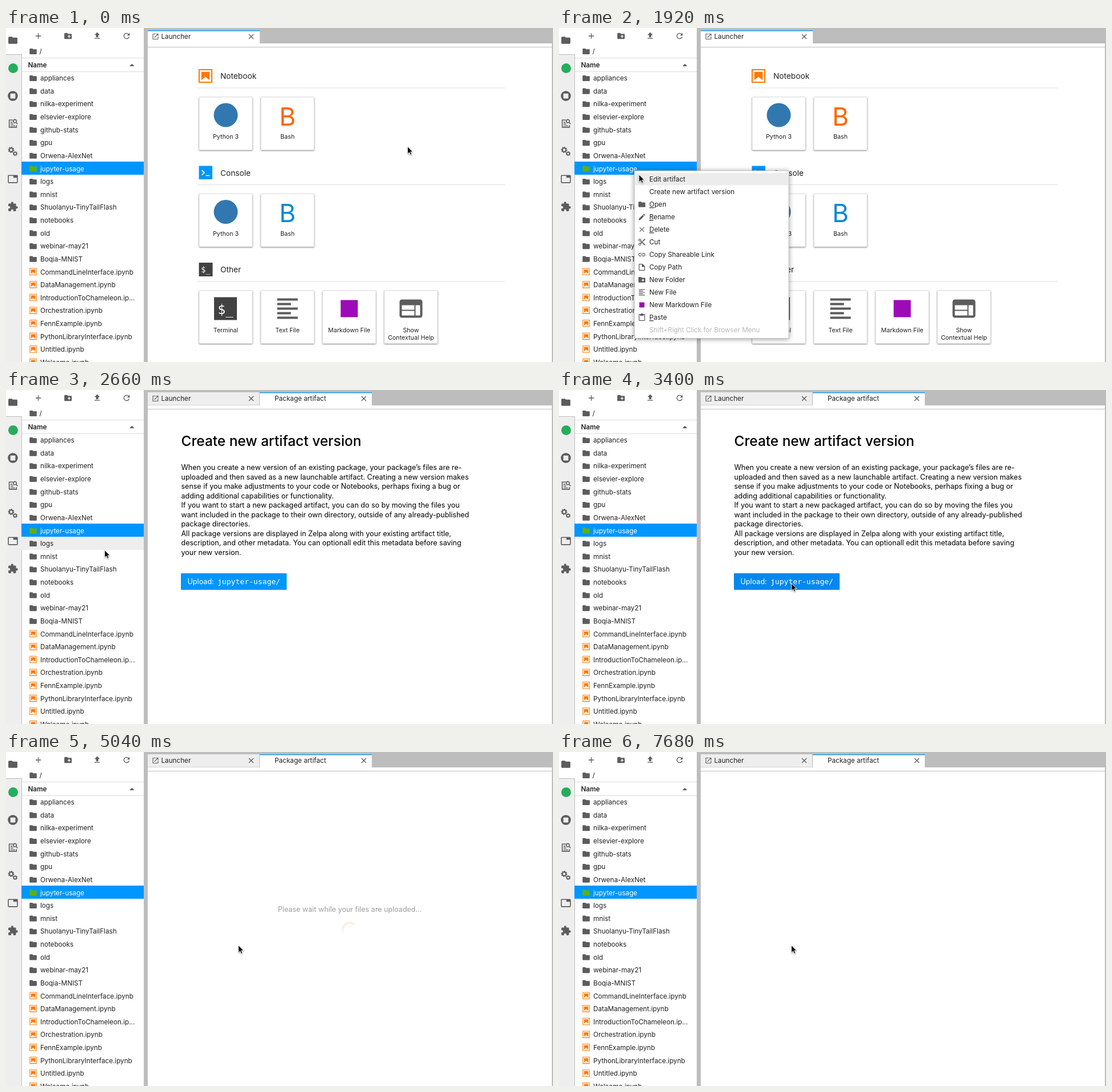
Write an HTML page that moves like this. It is 957 by 585 pixels and loops after 8000 ms.

```html
<!DOCTYPE html>
<html lang="en">
<head>
<meta charset="utf-8">
<title>Package artifact</title>
<style>
html, body { margin: 0; width: 100%; height: 100%; overflow: hidden; background: #fff; }
svg { display: block; width: 957px; height: 585px; }
text { font: 11.7px Inter, "Open Sans", sans-serif; font-optical-sizing: none; fill: #212121; white-space: pre; }
.bold { font-weight: 600; }
.medium { font-weight: 500; }
.mono { font-family: "DejaVu Sans Mono", monospace; }
.mid { text-anchor: middle; }
.card { fill: #fff; stroke: #e2e2e2; filter: drop-shadow(0 1px 1.3px #0007); }
.menu { fill: #fff; stroke: #c4c4c4; filter: drop-shadow(0 1px 4px #0006); }
.arrow { stroke: #fff; stroke-width: 1; filter: drop-shadow(0 1px 1px #0006); }
</style>
</head>
<body>
<svg id="stage" viewBox="0 0 957 585"></svg>
<script>
const GREY = '#5c5c5c', BLUE = '#0096ff', ORANGE = '#ff7800', LINE = '#bdbdbd', PURPLE = '#9c0bb5';
const ROW = 22.62, ROWS_TOP = 76;

// Icon outlines on a 24 x 24 grid
const ICONS = {
  folder: 'M10 4H4c-1.1 0-2 .9-2 2v12c0 1.1.9 2 2 2h16c1.1 0 2-.9 2-2V8c0-1.1-.9-2-2-2h-8z',
  newFolder: 'M20 6h-8l-2-2H4c-1.1 0-2 .9-2 2v12c0 1.1.9 2 2 2h16c1.1 0 2-.9 2-2V8c0-1.1-.9-2-2-2zm-1 8h-3v3h-2v-3h-3v-2h3V9h2v3h3z',
  add: 'M19 13h-6v6h-2v-6H5v-2h6V5h2v6h6z',
  upload: 'M5 20h14v-2H5zm0-10h4v6h6v-6h4l-7-7z',
  refresh: 'M17.65 6.35C16.2 4.9 14.2 4 12 4a8 8 0 1 0 7.73 10h-2.08A6 6 0 1 1 12 6c1.66 0 3.14.69 4.22 1.78L13 11h7V4z',
  puzzle: 'M20.5 11H19V7c0-1.1-.9-2-2-2h-4V3.5a2.5 2.5 0 0 0-5 0V5H4c-1.1 0-2 .9-2 2v3.8h1.5a2.7 2.7 0 0 1 0 5.4H2V20c0 1.1.9 2 2 2h3.8v-1.5a2.7 2.7 0 0 1 5.4 0V22H17c1.1 0 2-.9 2-2v-4h1.5a2.5 2.5 0 0 0 0-5z',
  tab: 'M21 3H3c-1.1 0-2 .9-2 2v14c0 1.1.9 2 2 2h18c1.1 0 2-.9 2-2V5c0-1.1-.9-2-2-2zm0 16H3V5h10v4h8z',
  stop: 'M12 2a10 10 0 1 0 0 20a10 10 0 1 0 0-20zM8 7h8q1 0 1 1v8q0 1-1 1H8q-1 0-1-1V8q0-1 1-1z',
  inspect: 'M3 3h9v2H5v14h14v-4h2v6H3zM7 8h4v2H7zm0 4h6v2H7zm0 4h10v1.6H7zM16.5 2a4.5 4.5 0 1 0 0 9q1.2 0 2.2-.5l3 3 1.4-1.4-2.9-3A4.5 4.5 0 0 0 16.5 2zm0 2a2.5 2.5 0 1 1 0 5a2.5 2.5 0 1 1 0-5z',
  edit: 'M3 17.25V21h3.75L17.8 9.94l-3.75-3.75zM20.7 7.04q.7-.7 0-1.4l-2.34-2.35q-.7-.7-1.4 0l-1.83 1.83 3.75 3.75z',
  close: 'M19 6.4L17.6 5 12 10.6 6.4 5 5 6.4 10.6 12 5 17.6 6.4 19 12 13.4 17.6 19 19 17.6 13.4 12z',
  cut: 'M6 2a4 4 0 1 0 1.64 7.64L10 12l-2.36 2.36A4 4 0 1 0 9.64 16.36L12 14l7 7h3v-1L9.64 7.64A4 4 0 0 0 6 2zm0 2a2 2 0 1 1 0 4a2 2 0 1 1 0-4zm0 12a2 2 0 1 1 0 4a2 2 0 1 1 0-4zM19 3l-6 6 2 2 7-7V3z',
  link: 'M11 7H7a5 5 0 0 0 0 10h4v-1.9H7a3.1 3.1 0 0 1 0-6.2h4zM8 11h8v2H8zM13 7h4a5 5 0 0 1 0 10h-4v-1.9h4a3.1 3.1 0 0 0 0-6.2h-4z',
  file: 'M5 2h9l7 7v11q0 2-2 2H5q-2 0-2-2V4q0-2 2-2zM5 4v16h14v-9h-7V4z',
  lines: 'M15 15H3v2h12zm0-8H3v2h12zM3 13h18v-2H3zm0 8h18v-2H3zM3 3v2h18V3z',
  paste: 'M19 2h-4.2a3 3 0 0 0-5.6 0H5c-1.1 0-2 .9-2 2v16c0 1.1.9 2 2 2h14c1.1 0 2-.9 2-2V4c0-1.1-.9-2-2-2zm0 18H5V4h2v3h10V4h2z',
  launch: 'M19 19H5V5h7V3H5q-2 0-2 2v14q0 2 2 2h14q2 0 2-2v-7h-2zM14 3v2h3.6l-9.8 9.8 1.4 1.4L19 6.4V10h2V3z',
  help: 'M20 4H4c-1.1 0-2 .9-2 2v12c0 1.1.9 2 2 2h16c1.1 0 2-.9 2-2V6c0-1.1-.9-2-2-2zm-5 14H4v-4h11zm0-5H4V9h11zm5 5h-4V9h4z',
  notebook: 'M2 2h20v20H2zM3.7 3.7v16.6h16.6V3.7zM6 6h12v12l-6-4.7L6 18z',
};

const icon = (name, x, y, size, color = GREY) =>
  `<path d="${ICONS[name]}" fill="${color}" fill-rule="evenodd" transform="translate(${x - size / 2} ${y - size / 2}) scale(${size / 24})"/>`;
const rect = (x, y, w, h, fill, more = '') =>
  `<rect x="${x}" y="${y}" width="${w}" height="${h}" fill="${fill}" ${more}/>`;
const dot = (x, y, r, fill) => `<circle cx="${x}" cy="${y}" r="${r}" fill="${fill}"/>`;
const text = (x, y, str, { size = 11.7, color = '#212121', cls = '' } = {}) =>
  `<text x="${x}" y="${y}" class="${cls}" style="font-size:${size}px;fill:${color}">${str}</text>`;
const group = (id, body) => `<g id="${id}">${body}</g>`;
const gear = (x, y, r) => `<g fill="none" stroke="${GREY}"><circle cx="${x}" cy="${y}" r="${r * .62}" stroke-width="${r * .42}"/>
  <circle cx="${x}" cy="${y}" r="${r * .88}" stroke-width="${r * .3}" pathLength="16" stroke-dasharray="1"/></g>`;

const folders = ['appliances', 'data', 'nilka-experiment', 'elsevier-explore', 'github-stats', 'gpu',
  'Orwena-AlexNet', 'jupyter-usage', 'logs', 'mnist', 'Shuolanyu-TinyTailFlash', 'notebooks', 'old',
  'webinar-may21', 'Boqia-MNIST'];
const notebooks = ['CommandLineInterface.ipynb', 'DataManagement.ipynb', 'IntroductionToChameleon.ip...',
  'Orchestration.ipynb', 'FennExample.ipynb', 'PythonLibraryInterface.ipynb', 'Untitled.ipynb', 'Welcome.ipynb'];
const SELECTED = 7;
const rowTop = i => Math.round(ROWS_TOP + ROW * i);

function sidebar() {
  const rows = [...folders, ...notebooks].map((name, i) => {
    const y = 88 + ROW * i, on = i === SELECTED;
    return (i < folders.length ? icon('folder', 47.5, y, 15.2, on ? '#5fae1c' : GREY)
                               : icon('notebook', 47.5, y - .5, 15, ORANGE))
      + text(60, y + 4.2, name, { color: on ? '#fff' : undefined });
  }).join('');
  return rect(0, 0, 28, 585, '#eee') + rect(0, 0, 28, 46, '#fff')
    + rect(0, 46, 28, 1, LINE) + rect(27, 46, 1, 539, LINE)
    + icon('folder', 12, 21.5, 19) + dot(12.5, 70.5, 8.5, '#25ad5c') + icon('stop', 12, 119, 21)
    + icon('inspect', 12, 167.5, 19) + gear(9, 213.5, 5.3) + gear(16, 220, 4)
    + icon('tab', 12, 264.5, 19) + icon('puzzle', 12, 313, 19)
    + icon('add', 56.5, 14, 16) + icon('newFolder', 108.5, 14, 15.5)
    + icon('upload', 159.5, 13.5, 16) + icon('refresh', 211, 14, 16)
    + icon('folder', 47.5, 41, 15) + text(58.5, 45.2, '/')
    + rect(28, 52, 213, 1, '#dcdcdc') + rect(28, 76, 213, 1, '#dcdcdc')
    + text(38.5, 69, 'Name', { cls: 'bold' }) + `<path d="M216 67l4.2-4.2 4.2 4.2z" fill="${GREY}"/>`
    + rect(27, 0, 214, 23, '#eee', 'id="hover"')
    + rect(27, rowTop(SELECTED), 214, 23, BLUE) + rows;
}

const dock = () => rect(241, 0, 716, 585, LINE) + rect(248, 27, 707, 558, '#fff') + rect(248, 33, 707, 1, LINE);

const tab = (x, active) => active
  ? rect(x, 4, 196, 24, '#fff') + rect(x, 4, 196, 1.5, '#1a9cf5')
  : rect(x, 4, 195, 22.5, '#eee');
const launcherTab = active => tab(248, active) + icon('launch', 261.5, 15, 13.5)
  + text(271.5, 19.2, 'Launcher') + icon('close', 429, 15, 15.5);

const shell = (x, y, s, font) => rect(x - s / 2, y - s / 2, s, s, '#424242')
  + text(x, y + font * .4, '$_', { size: font, color: '#fff', cls: 'mono mid' });

function launcher() {
  const section = (y, title) => text(375, y + 5, title, { size: 13.7 }) + rect(335, y + 20.5, 538, 1, '#dedede');
  const card = (col, y, picture, ...labels) => {
    const x = 384.5 + 108 * col;
    return `<rect class="card" x="${x - 46.5}" y="${y}" width="93" height="92.5" rx="1"/>` + picture(x, y + 31.5)
      + labels.map((s, i) => text(x, y + 73 + 13 * i, s, { size: 10.7, cls: 'mid' })).join('');
  };
  const disc = (x, y) => dot(x, y, 21, '#3278b0');
  const letter = color => (x, y) => text(x, y + 18, 'B', { size: 44, color, cls: 'mid' });
  return launcherTab(true)
    + section(84, 'Notebook') + icon('notebook', 349, 84, 29, ORANGE)
    + card(0, 121, disc, 'Python 3') + card(1, 121, letter('#ff6600'), 'Bash')
    + section(253.5, 'Console') + rect(337.5, 241.5, 23.5, 23.5, BLUE)
    + '<path d="M342.500 249l4.500 4.300-4.500 4.300M349.500 258.500h7" fill="none" stroke="#fff" stroke-width="1.700"/>'
    + card(0, 290.5, disc, 'Python 3') + card(1, 290.5, letter('#0a88d8'), 'Bash')
    + section(423, 'Other') + shell(349.5, 423, 24, 13.5)
    + card(0, 460, (x, y) => shell(x - .5, y, 40, 22.5), 'Terminal')
    + card(1, 460, (x, y) => icon('lines', x, y, 48), 'Text File')
    + card(2, 460, (x, y) => rect(x - 15, y - 15, 30, 30, PURPLE), 'Markdown File')
    + card(3, 460, (x, y) => icon('help', x, y, 48), 'Show', 'Contextual Help');
}

const packageTab = () => launcherTab(false) + tab(444, true)
  + text(470, 19.2, 'Package artifact') + icon('close', 626, 15, 15.5);

function form() {
  const lines = [
    'When you create a new version of an existing package, your package’s files are re-',
    'uploaded and then saved as a new launchable artifact. Creating a new version makes',
    'sense if you make adjustments to your code or Notebooks, perhaps fixing a bug or',
    'adding additional capabilities or functionality.',
    'If you want to start a new packaged artifact, you can do so by moving the files you',
    'want included in the package to their own directory, outside of any already-published',
    'package directories.',
    'All package versions are displayed in Zelpa along with your existing artifact title,',
    'description, and other metadata. You can optionall edit this metadata before saving',
    'your new version.'];
  return text(306.5, 97.7, 'Create new artifact version', { size: 24.4, color: '#000', cls: 'medium' })
    + lines.map((s, i) => text(306.5, 140.2 + 16.5 * i, s, { size: 12.5, color: '#000' })).join('')
    + rect(306, 321, 185, 29, BLUE, 'id="button" rx="1"')
    + text(317.5, 340.3, 'Upload:', { size: 12.6, color: '#fff' })
    + text(370, 340.3, 'jupyter-usage/', { size: 13.05, color: '#fff', cls: 'mono' });
}

const waiting = () => text(601.5, 280.4, 'Please wait while your files are uploaded...', { size: 12.5, color: '#9e9e9e', cls: 'mid' })
  + `<linearGradient id="fade"><stop offset=".1" stop-color="#ff6a00"/><stop offset=".42" stop-color="#ff6a00" stop-opacity="0"/></linearGradient>`
  + group('spinner', dot(0, 0, 14.2, 'url(#fade)') + '<path d="M0 0H-14.200A14.200 14.200 0 0 1 0-14.200z" fill="#ff6a00"/>' + dot(0, 0, 10.7, '#fff'));

function menu() {
  const key = s => `<tspan text-decoration="underline">${s[0]}</tspan>${s.slice(1)}`;
  const items = [['Edit artifact'], ['Create new artifact version'], [key('Open'), 'folder'], [key('Rename'), 'edit'],
    [key('Delete'), 'close'], ['Cut', 'cut'], ['Copy Shareable Link', 'link'], ['Copy Path', 'file'],
    ['New Folder', 'newFolder'], ['New File', 'lines'], ['New Markdown File', 'square'], [key('Paste'), 'paste'],
    ['Shift+Right Click for Browser Menu']];
  return '<rect class="menu" x="132" y="250" width="270" height="293.500"/>'
    + rect(132.5, 0, 269, 21.5, '#ececec', 'id="menuHover"')
    + items.map(([label, name], i) => {
      const y = 265 + 22 * i;
      return (name === 'square' ? rect(140.5, y - 4.5, 9, 9, PURPLE) : name ? icon(name, 145, y, 14.5) : '')
        + text(158, y + 4.2, label, { color: i === 12 ? '#b8b8b8' : undefined });
    }).join('');
}

const $ = id => document.getElementById(id);
$('stage').innerHTML = dock() + sidebar() + group('launcher', launcher())
  + group('package', packageTab() + group('form', form()) + group('waiting', waiting()))
  + group('menu', menu())
  + '<path id="cursor" class="arrow" d="M.5.500V13.700L3.600 10.800 5.600 15.300 7.900 14.300 5.900 9.900H10z"/>';

const LOOP = 8000, STEP = 145;
const MENU = 1620, FORM = 2660, UPLOAD = 4890, DONE = 7680;
const START = [702, 207];
const MOVES = [
  { at: 150, steps: 8, to: [128, 248] },
  { at: 1920, steps: 3, to: [172, 280] },
  { at: 2950, steps: 4, to: [406, 338] }];

const clamp = (v, lo, hi) => Math.min(hi, Math.max(lo, v));
const smooth = v => { v = clamp(v, 0, 1); return v * v * (3 - 2 * v); };
const show = (id, on) => { $(id).style.display = on ? '' : 'none'; };

function pointer(t) {
  let [x, y] = START;
  for (const { at, steps, to } of MOVES) {
    const k = smooth(clamp(Math.floor((t - at) / STEP) + 1, 0, steps) / steps);
    x += (to[0] - x) * k;
    y += (to[1] - y) * k;
  }
  return [x, y];
}

function draw(t) {
  const [x, y] = pointer(t);
  $('cursor').setAttribute('transform', `translate(${x} ${y})`);

  const menuOpen = t >= MENU && t < FORM;
  show('launcher', t < FORM);
  show('package', t >= FORM);
  show('form', t < UPLOAD);
  show('waiting', t >= UPLOAD && t < DONE);
  show('menu', menuOpen);

  show('menuHover', x > 132 && y > 254);
  $('menuHover').setAttribute('y', 254 + 22 * Math.floor((y - 254) / 22));
  // The arrow's tip lies a pixel inside its outline
  show('hover', !menuOpen && x < 241);
  $('hover').setAttribute('y', rowTop(Math.floor((y - 1 - ROWS_TOP) / ROW)));
  $('button').setAttribute('fill', x > 306 && y > 321 ? '#0488ee' : BLUE);

  // The spinner turns once a second and fades in during its first turn
  const tick = 146.8, age = (Math.floor((t - UPLOAD) / tick) * tick - 30) / 1000;
  $('spinner').setAttribute('transform', `translate(601.5 311.5) rotate(${age * 360})`);
  $('spinner').setAttribute('opacity', smooth(Math.max(age, 0) ** .7));
}

const begin = performance.now();
(function frame() {
  draw((performance.now() - begin) % LOOP);
  requestAnimationFrame(frame);
})();
</script>
</body>
</html>
```
